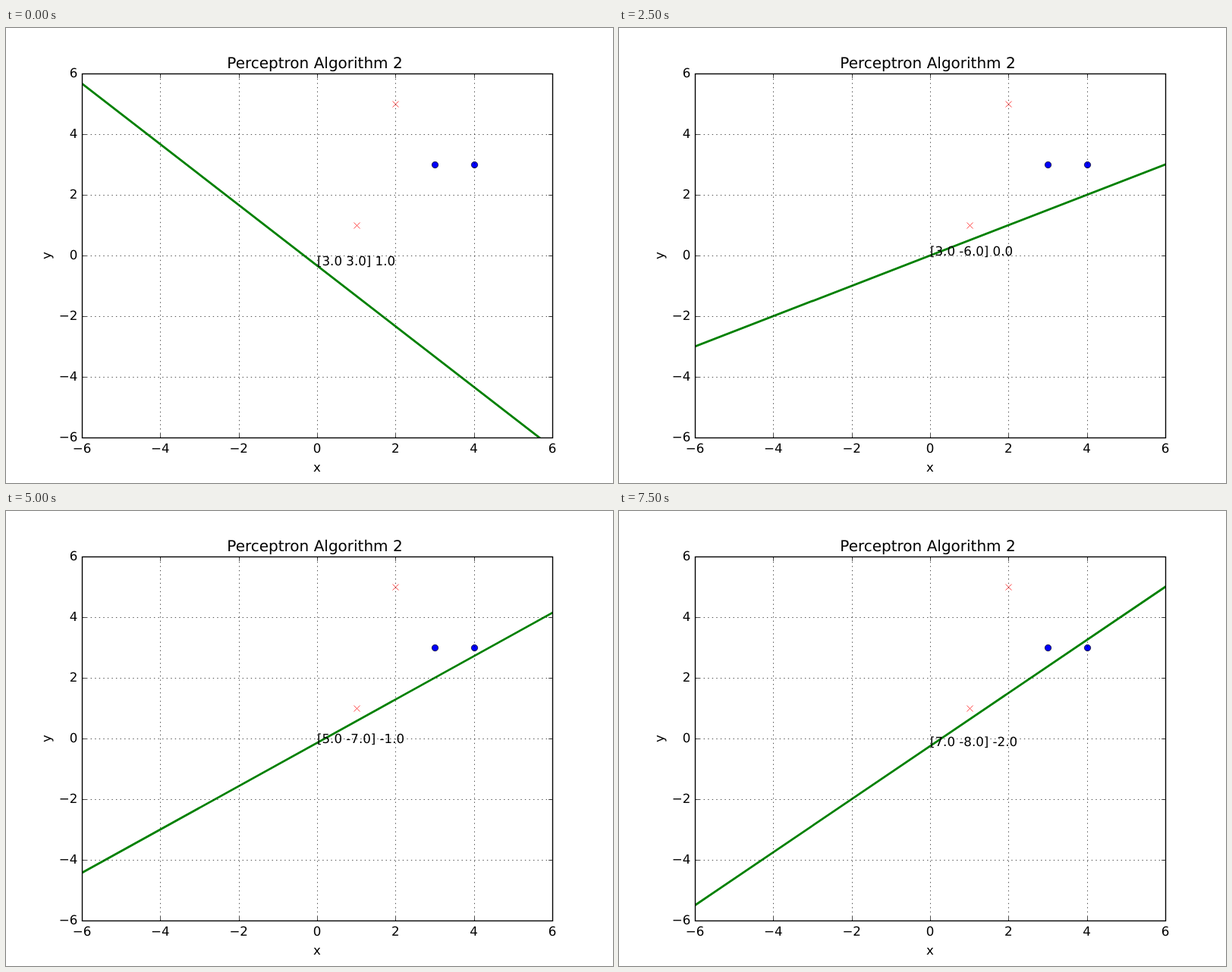
These frames come from a looping animation (800 px wide and 600 px high, 8 s). An HTML page:

```html
<!DOCTYPE html>
<html lang="en">
<head>
<meta charset="utf-8">
<title>Perceptron</title>
<style>
  html, body { margin: 0; width: 100%; height: 100%; overflow: hidden; background: #fff; }
  svg { display: block; width: 800px; height: 600px; }
  text { font: 16.667px "DejaVu Sans", sans-serif; text-rendering: geometricPrecision; }
  .title { font-size: 20px; }
  .mid { text-anchor: middle; }
  .end { text-anchor: end; }
  .grid, .tick { stroke: #000; stroke-width: .694; fill: none; }
  .grid { stroke-dasharray: 1.389 4.167; }
  .cross { stroke: #f00; stroke-width: .694; }
  .dot { fill: #00f; stroke: #000; stroke-width: .694; }
</style>
</head>
<body>
<svg id="plot" viewBox="0 0 800 600">
  <clipPath id="area"><rect x="100" y="60" width="620" height="480"/></clipPath>
  <path id="line" clip-path="url(#area)" stroke="#008000" stroke-width="2.778"/>
</svg>
<script>
const plot = document.getElementById('plot');
const line = document.getElementById('line');
const px = x => 410 + x * 620 / 12;
const py = y => 300 - y * 40;
const snap = v => Math.round(v) + .5;

function add(tag, attrs, content = '') {
  const el = document.createElementNS('http://www.w3.org/2000/svg', tag);
  for (const key in attrs) el.setAttribute(key, attrs[key]);
  el.textContent = content;
  return plot.appendChild(el);
}
const path = (cls, d) => add('path', { class: cls, d });
const label = (x, y, cls, s) => add('text', { x, y, class: cls }, s);

// Training samples: [x, y, class]
const samples = [[3, 3, 1], [4, 3, 1], [2, 5, -1], [1, 1, -1]];
for (const [x, y, kind] of samples) {
  const cx = snap(px(x)), cy = snap(py(y));
  if (kind > 0) add('circle', { class: 'dot', cx, cy, r: 4.167 });
  else path('cross', `M${cx - 4} ${cy - 4}l8 8m0 -8l-8 8`);
}

// Grid, ticks and tick labels
for (let v = -6; v <= 6; v += 2) {
  const x = snap(px(v)), y = snap(py(v));
  const name = String(v).replace('-', '\u2212');
  if (Math.abs(v) < 6) {
    path('grid', `M${x} 540.5V60.5`);
    path('grid', `M100.5 ${y}H720.5`);
  }
  path('tick', `M${x} 540.5v-5.56M${x} 60.5v5.56M100.5 ${y}h5.56M720.5 ${y}h-5.56`);
  label(px(v), 560, 'mid', name);
  label(94.4, py(v) + 5, 'end', name);
}
add('rect', { x: 100.5, y: 60.5, width: 620, height: 480, fill: 'none', stroke: '#000', 'stroke-width': 1.389 });
label(407, 53, 'mid title', 'Perceptron Algorithm 2');
label(410, 585, 'mid', 'x');
add('text', { class: 'mid', transform: 'translate(59 300) rotate(-90)' }, 'y');
const readout = label(410, 300, '', '');

// Each step corrects the weights with the first misclassified sample
const states = [[3, 3, 1]];
while (states.length < 16) {
  const [a, b, c] = states[states.length - 1];
  const [x, y, k] = samples.find(([x, y, k]) => k * (a * x + b * y + c) <= 0);
  states.push([a + k * x, b + k * y, c + k]);
}

let shown = -1;
function draw() {
  const step = Math.floor(performance.now() / 500) % states.length;
  if (step !== shown) {
    shown = step;
    const [a, b, c] = states[step];
    const at = x => -(a * x + c) / b;
    line.setAttribute('d', `M${px(-7)} ${py(at(-7))}L${px(7)} ${py(at(7))}`);
    readout.setAttribute('y', Math.round(py(at(0))));
    readout.textContent = `[${a.toFixed(1)} ${b.toFixed(1)}] ${c.toFixed(1)}`;
  }
  requestAnimationFrame(draw);
}
draw();
</script>
</body>
</html>
```
